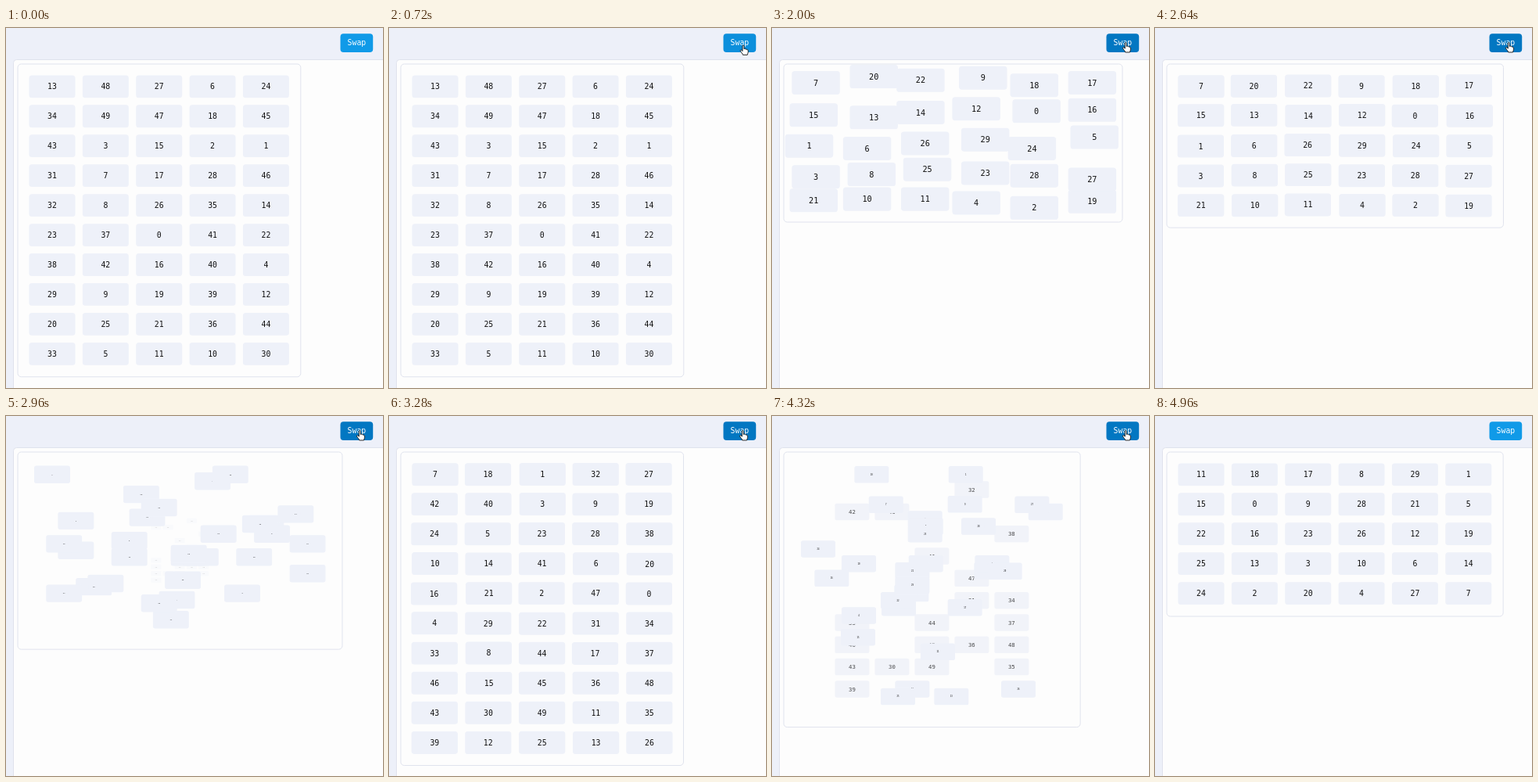
These frames come from a looping animation (482x460 px, 5.2 s). An HTML page with a canvas:

```html
<!DOCTYPE html>
<html lang="en">
<head>
<meta charset="utf-8">
<title>Swap grid</title>
<style>
  html, body { margin: 0; width: 100%; height: 100%; overflow: hidden; background: #edf0f9; }
  canvas { display: block; width: 482px; height: 460px; }
</style>
</head>
<body>
<canvas id="stage"></canvas>
<script>
const W = 482, H = 460, LOOP = 5200, MOVE = 650;
const TILE_W = 59, TILE_H = 28.8, STEP_X = 68.35, STEP_Y = 37.95;
const PANEL_X = 14.8, PANEL_Y = 45.7, PAD = 14.7;
const FONT = '"DejaVu Sans Mono", "Noto Sans Mono", monospace';

const canvas = document.getElementById('stage');
const ctx = canvas.getContext('2d');
const dpr = window.devicePixelRatio || 1;
canvas.width = W * dpr;
canvas.height = H * dpr;

function layout(cols, order) {
  const items = order.split(' ').map(Number);
  const rows = items.length / cols;
  const w = PAD * 2 + cols * STEP_X - (STEP_X - TILE_W);
  const h = PAD * 2 + rows * STEP_Y - (STEP_Y - TILE_H);
  const spots = new Map(items.map((n, i) => [n, {
    x: PANEL_X + PAD + TILE_W / 2 + (i % cols) * STEP_X,
    y: PANEL_Y + PAD + TILE_H / 2 + Math.floor(i / cols) * STEP_Y
  }]));
  return { w, h, spots, center: { x: PANEL_X + w / 2, y: PANEL_Y + h / 2 } };
}

const layouts = [
  layout(5, '13 48 27 6 24 34 49 47 18 45 43 3 15 2 1 31 7 17 28 46 32 8 26 35 14 ' +
    '23 37 0 41 22 38 42 16 40 4 29 9 19 39 12 20 25 21 36 44 33 5 11 10 30'),
  layout(6, '7 20 22 9 18 17 15 13 14 12 0 16 1 6 26 29 24 5 3 8 25 23 28 27 21 10 11 4 2 19'),
  layout(5, '7 18 1 32 27 42 40 3 9 19 24 5 23 28 38 10 14 41 6 20 16 21 2 47 0 ' +
    '4 29 22 31 34 33 8 44 17 37 46 15 45 36 48 43 30 49 11 35 39 12 25 13 26'),
  layout(6, '11 18 17 8 29 1 15 0 9 28 21 5 22 16 23 26 12 19 25 13 3 10 6 14 24 2 20 4 27 7')
];
const swaps = [1493, 2635, 3988];

// time, x, y of the pointer tip
const pointerPath = [
  [620, 455.5, 32], [640, 455, 30], [720, 453, 22], [800, 452.3, 18.6],
  [4530, 452.3, 18.6], [4560, 457, 14], [4640, 470, 1], [4710, 479, -14]
];
const hoverIn = 690, hoverOut = 4600, hoverFade = 100;

const clamp = v => Math.min(1, Math.max(0, v));
const lerp = (a, b, p) => a + (b - a) * p;
const mix = (a, b, p) => ({ x: lerp(a.x, b.x, p), y: lerp(a.y, b.y, p) });

// cubic-bezier(.8, -.4, .4, 1.4)
function ease(t) {
  if (t <= 0 || t >= 1) return clamp(t);
  const curve = (a, b, s) => 3 * (1 - s) * (1 - s) * s * a + 3 * (1 - s) * s * s * b + s * s * s;
  let lo = 0, hi = 1;
  for (let i = 0; i < 30; i++) {
    const mid = (lo + hi) / 2;
    if (curve(.8, .4, mid) < t) lo = mid; else hi = mid;
  }
  return curve(-.4, 1.4, lo);
}

function box(x, y, w, h, r, fill, stroke) {
  ctx.beginPath();
  ctx.roundRect(x, y, w, h, r);
  if (fill) { ctx.fillStyle = fill; ctx.fill(); }
  if (stroke) { ctx.strokeStyle = stroke; ctx.lineWidth = 1; ctx.stroke(); }
}

function label(text, x, y, color) {
  ctx.font = '500 9.8px ' + FONT;
  ctx.textAlign = 'center';
  ctx.textBaseline = 'alphabetic';
  ctx.fillStyle = color;
  ctx.fillText(text, x, y + 3.5);
}

function tile(n, at, scale, alpha = 1) {
  if (scale <= 0 || alpha <= 0) return;
  ctx.save();
  ctx.globalAlpha = Math.min(1, alpha);
  ctx.translate(at.x, at.y);
  ctx.scale(scale, scale);
  box(-TILE_W / 2, -TILE_H / 2, TILE_W, TILE_H, 3.5, '#eef1f9');
  label(n, 0, 0, '#111');
  ctx.restore();
}

function drawGrid(t) {
  let k = swaps.filter(s => t >= s).length;
  const to = layouts[k], from = layouts[Math.max(0, k - 1)];
  const p = k ? ease((t - swaps[k - 1]) / MOVE) : 1;
  box(PANEL_X + .2, PANEL_Y + .3, lerp(from.w, to.w, p), lerp(from.h, to.h, p), 4.5, null, '#e0e3ee');

  // tiles that leave or enter pass through the centre of the smaller grid
  const stay = [];
  for (let n = 0; n < 50; n++) {
    const a = from.spots.get(n), b = to.spots.get(n);
    if (a && b) stay.push(n);
    else if (a) tile(n, mix(a, to.center, p), 1 - p, 1 - p);
    else if (b) tile(n, mix(from.center, b, p), p, p);
  }
  for (const n of stay) {
    const at = mix(from.spots.get(n), to.spots.get(n), p);
    tile(n, at, 1 - p);
    tile(n, at, p);
  }
}

function drawButton(t) {
  const h = clamp((t - hoverIn) / hoverFade) - clamp((t - hoverOut) / hoverFade);
  const color = `rgb(${lerp(16, 2, h)},${lerp(154, 119, h)},${lerp(232, 194, h)})`;
  box(427.5, 7.3, 41.7, 23.6, 4, color);
  label('Swap', 448.4, 18.8, '#fff');
}

const hand = new Path2D('M-1 1C-1-.3 1-.3 1 1V5C1.6 4.2 3 4.4 3.1 5.3C3.8 4.8 4.8 5.2 4.8 6' +
  'C5.6 5.6 6.2 6.1 6.2 7V9C6.2 10.4 5.2 10.9 5.2 12.4H-.6C-.8 10.8-2.6 9.4-3.7 7.4' +
  'C-4.2 6.4-3 5.6-2.2 6.4L-1 7.6Z');
const arrow = new Path2D('M0 0V10.5L2.5 8.2L4.1 12L5.8 11.2L4.2 7.6H7.5Z');

function drawPointer(t) {
  const i = pointerPath.findIndex(k => k[0] > t);
  if (i < 1) return;
  const [t0, x0, y0] = pointerPath[i - 1], [t1, x1, y1] = pointerPath[i];
  const p = (t - t0) / (t1 - t0);
  const over = t >= hoverIn && t < hoverOut;
  ctx.save();
  ctx.translate(lerp(x0, x1, p), lerp(y0, y1, p));
  ctx.lineWidth = .9;
  ctx.lineJoin = 'round';
  ctx.fillStyle = over ? '#fff' : '#111';
  ctx.strokeStyle = over ? '#111' : '#fff';
  const shape = over ? hand : arrow;
  ctx.fill(shape);
  ctx.stroke(shape);
  ctx.restore();
}

function draw(t) {
  ctx.setTransform(dpr, 0, 0, dpr, 0, 0);
  ctx.fillStyle = '#edf0f9';
  ctx.fillRect(0, 0, W, H);
  box(9.5, 40.5, W, H, 4, '#fdfdfd', '#dfe2ed');
  drawGrid(t);
  drawButton(t);
  drawPointer(t);
}

const start = performance.now();
function tick() {
  draw((performance.now() - start) % LOOP);
  requestAnimationFrame(tick);
}
tick();
</script>
</body>
</html>
```
